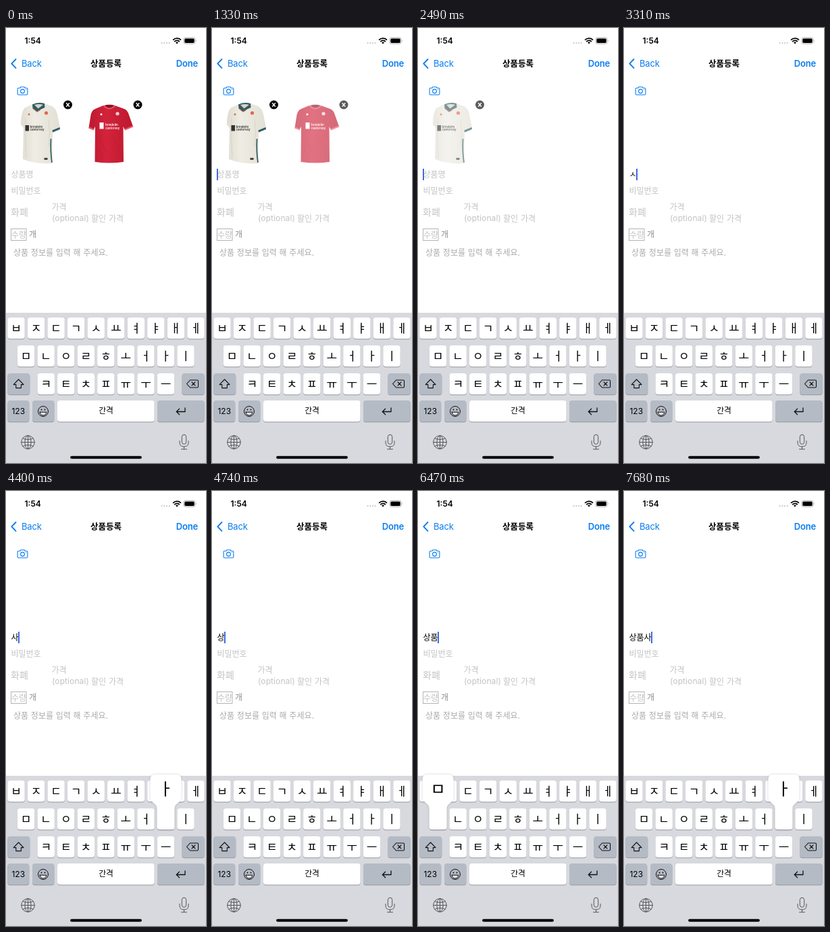
Recreate the animation shown at these times as an HTML page. Size 296 px wide and 640 px high, loop 8000 ms.

```html
<!DOCTYPE html>
<html lang="ko">
<head>
<meta charset="utf-8">
<title>상품등록</title>
<style>
html, body { margin: 0; width: 100%; height: 100%; overflow: hidden; background: #fff; }
svg { display: block; width: 100%; height: 100%; }
text { font-family: "Noto Sans CJK KR", "Noto Sans CJK", "Noto Sans CJK JP", sans-serif; font-size: 12px; }
.latin { font-family: Inter, sans-serif; }
.blue { fill: #0a7dee; }
.hint { fill: #c3c3c5; }
.line { fill: none; stroke: #0a7dee; stroke-width: 1.1; stroke-linecap: round; stroke-linejoin: round; }
.icon { fill: none; stroke: #111; stroke-width: 1.1; stroke-linecap: round; stroke-linejoin: round; }
.mid { text-anchor: middle; }
.cap { font-size: 17px; text-anchor: middle; }
.sponsor { font: 600 4.4px Inter, sans-serif; }
#popup path { filter: drop-shadow(0 0 1.5px rgba(0, 0, 0, .2)); }
</style>
</head>
<body>
<svg viewBox="0 0 296 640">
  <defs>
    <linearGradient id="cream"><stop stop-color="#dfdcd1"/><stop offset=".35" stop-color="#efece3"/><stop offset="1" stop-color="#e2dfd4"/></linearGradient>
    <linearGradient id="red"><stop stop-color="#bd1930"/><stop offset=".4" stop-color="#d3233b"/><stop offset="1" stop-color="#bb182e"/></linearGradient>
    <g id="close">
      <circle r="6.5"/>
      <path d="M-2.3-2.8 2.3 2.8M2.3-2.8-2.3 2.8" stroke="#fff" stroke-width="1.4"/>
    </g>
  </defs>

  <!-- status bar -->
  <text class="latin" x="27.5" y="23" style="font-weight:600">1:54</text>
  <g fill="#c4c4c6"><circle cx="230.5" cy="22" r="1.1"/><circle cx="234.3" cy="22" r="1.1"/><circle cx="238" cy="22" r="1.1"/><circle cx="241.7" cy="22" r="1.1"/></g>
  <path d="M247 17.6Q253 12.6 259 17.6M249.2 20Q253 16.8 256.8 20" fill="none" stroke="#000" stroke-width="1.8"/>
  <path d="M251 21.2Q253 19.8 255 21.2L253 23.4Z"/>
  <rect x="263" y="14.2" width="17" height="9" rx="2.6" fill="none" stroke="#999" stroke-width=".8"/>
  <rect x="264.3" y="15.5" width="14.4" height="6.4" rx="1.6"/>
  <path d="M281 17.2q1.4 1.5 0 3z" fill="#999"/>

  <!-- navigation bar -->
  <path class="line" d="M14.5 46 8.3 52.4 14.5 58.8" style="stroke-width:1.9"/>
  <text class="latin blue" x="23" y="57" style="font-size:13px;letter-spacing:-.2px">Back</text>
  <text class="mid" x="148" y="57" style="font-size:12.5px;font-weight:600">상품등록</text>
  <text class="latin blue" x="284" y="57" text-anchor="end" style="font-size:13px;font-weight:600;letter-spacing:-.15px">Done</text>
  <path class="line" d="M18.600 88.300h2.200l1.200-1.600h5l1.200 1.600h2.200q1.500 0 1.500 1.500v6.900q0 1.500-1.500 1.500H18.600q-1.500 0-1.500-1.500v-6.900q0-1.500 1.500-1.500z"/>
  <circle class="line" cx="24.500" cy="93" r="2.900"/>
  <circle class="blue" cx="29.600" cy="90.600" r=".6"/>

  <!-- pictures -->
  <g id="away">
    <path d="M39 112Q48 118 57 111L68 115Q74 118 76 127L80 147 69 152 68.500 199Q45 201 25 193L26 147 22 142Q22 126 27 118Z" fill="url(#cream)"/>
    <path d="M39 112.500Q48 108.500 57 111L57.500 117 51 120 46 123 39.500 118Z" fill="#2f5c62"/>
    <path d="M42 113Q49 111 55 113L47.500 118.500Z" fill="#d8d2c5"/>
    <path d="M39.500 118.500 46 123.500 51 120.500" fill="none" stroke="#d9584a"/>
    <path d="M68.500 150.500 79.500 146 80 149 69 153.500Z" fill="#2f5c62"/>
    <path d="M66.500 163Q65.500 182 68 198" fill="none" stroke="#2f5c62" stroke-width="1.700"/>
    <path d="M29 132Q28 160 30 190M63 134Q66 153 63 174" fill="none" stroke="#d5d1c5" stroke-width=".8"/>
    <circle cx="34" cy="127" r="1.500" fill="#e0684f"/>
    <circle cx="59.500" cy="125" r="2.600" fill="#e0684f"/>
    <rect x="28.500" y="143" width="5.500" height="8.500" fill="#333"/>
    <text class="sponsor" x="35.500" y="147" fill="#333">brindelm</text>
    <text class="sponsor" x="35.500" y="151" fill="#333">castorvey</text>
    <rect x="56.500" y="191" width="5" height="3" fill="#3d4b45"/>
    <use href="#close" x="91.500" y="113"/>
  </g>
  <g id="home">
    <path d="M144 114Q153 118 161 114L175 119Q180 121 182 128L188 145 176 150 173.500 145 174 197Q153 200 131.500 197L132 145 129.500 150 122.500 147 125.500 128Q127 121 132 119Z" fill="url(#red)"/>
    <path d="M145 114Q153 111.500 161 114L158 117.500Q153 120.500 148 117.500Z" fill="#8f1425"/>
    <path d="M144.500 114Q153 123 161.500 114" fill="none" stroke="#f06a70" stroke-width="1.400"/>
    <path d="M122.500 146.500 130 149.500M176 149.500 188 144.500" stroke="#f0595f" stroke-width="2.200"/>
    <path d="M136 160 150 184M158 160 172 188M136 177 144 192M160 133 170 143M136 133 144 140" stroke="#c21c33" fill="none"/>
    <circle cx="141" cy="127" r="1.500" fill="#fff"/>
    <circle cx="165" cy="126" r="2.600" fill="#f3cdd0"/>
    <rect x="138.500" y="139" width="6" height="9.500" fill="#fff"/>
    <text class="sponsor" x="147" y="144" fill="#fff">brindelm</text>
    <text class="sponsor" x="147" y="148.500" fill="#fff">castorvey</text>
    <use href="#close" x="195" y="113"/>
  </g>

  <!-- form -->
  <text id="name" x="7.500" y="219.800"></text>
  <rect id="caret" y="207" width="2" height="17" fill="#3f6be0"/>
  <g class="hint">
    <text x="7.500" y="243.600">비밀번호</text>
    <text x="7" y="276" style="font-size:14px">화폐</text>
    <text x="67.500" y="267.500">가격</text>
    <text class="latin" x="68" y="284" style="letter-spacing:.1px">(optional)</text>
    <text x="126" y="284.500">할인</text>
    <text x="152" y="284.500">가격</text>
    <text x="8" y="308.500">수량</text>
  </g>
  <rect x="7.500" y="295.500" width="22.500" height="17" fill="none" stroke="#b4b4b6"/>
  <text x="34" y="308" fill="#8e8e90">개</text>
  <text x="11" y="334.500" fill="#aaaaac" style="word-spacing:.4px">상품 정보를 입력 해 주세요.</text>

  <!-- keyboard -->
  <rect y="419" width="296" height="221" fill="#d7d9de"/>
  <g id="keys"></g>
  <path class="icon" d="M18.600 517 26 524.600H22.400V529.600H14.800V524.600H11.200Z"/>
  <path class="icon" d="M272.500 518H283Q284.500 518 284.500 519.500V527.500Q284.500 529 283 529H272.500L267.500 523.500ZM275 521 280 526M280 521 275 526"/>
  <text class="latin mid" x="18.300" y="568.200" style="font-size:12px">123</text>
  <g class="icon" style="stroke-width:1"><circle cx="55" cy="564" r="7.500"/><path d="M50.200 565.200H59.800Q59 570 55 570T50.200 565.200Z" fill="#e4e7ec"/></g>
  <circle cx="52.500" cy="561.500" r=".9"/><circle cx="57.500" cy="561.500" r=".9"/>
  <text class="mid" x="148" y="567.300" style="font-size:11.800px">간격</text>
  <path class="icon" d="M265 559V564.500H252.500M256.500 560.300 252.300 564.500 256.500 568.700" style="stroke-width:1.300"/>
  <g class="icon" style="stroke:#55585e;stroke-width:1">
    <circle cx="32.500" cy="609.500" r="9.800"/><ellipse cx="32.500" cy="609.500" rx="4.600" ry="9.800"/>
    <path d="M22.700 609.500h19.600M32.500 599.700v19.600M24.800 603.700Q32.500 607.500 40.200 603.700M24.800 615.300Q32.500 611.500 40.200 615.300"/>
    <rect x="260.300" y="598.300" width="6.400" height="14" rx="3.200"/><path d="M257 607.500v2.500q0 6 6.500 6t6.500-6v-2.500M263.500 616v3.700M259.500 619.700h8"/>
  </g>
  <rect x="95.100" y="629.800" width="105.800" height="4" rx="2"/>
  <g id="popup"><path fill="#fff"/><text class="mid" style="font-size:24px"></text></g>
</svg>
<script>
const $ = id => document.getElementById(id);
const LOOP = 8000, PITCH = 29.55, KEY_HEIGHT = 31.2;
const rows = [["ㅂㅈㄷㄱㅅㅛㅕㅑㅐㅔ", 15, 426], ["ㅁㄴㅇㄹㅎㅗㅓㅏㅣ", 29.6, 467], ["ㅋㅌㅊㅍㅠㅜㅡ", 59.2, 508]];
const centers = {};

const keyShape = (x, y, w, fill) =>
  `<rect x="${x}" y="${y + 1}" width="${w}" height="${KEY_HEIGHT}" rx="4" fill="#94979d"/>` +
  `<rect x="${x}" y="${y}" width="${w}" height="${KEY_HEIGHT}" rx="4" fill="${fill}"/>`;

let keys = "";
for (const [letters, start, y] of rows) {
  [...letters].forEach((letter, i) => {
    const x = start + i * PITCH;
    centers[letter] = [x, y];
    keys += keyShape(x - 12.7, y, 25.4, "#fff") + `<text class="cap" x="${x}" y="${y + 21.6}">${letter}</text>`;
  });
}
for (const [x, y, w] of [[2.3, 508, 33], [260.3, 508, 33.4], [2.3, 548, 32], [39, 548, 32.4], [224, 548, 69.7]])
  keys += keyShape(x, y, w, "#b5bbc5");
$("keys").innerHTML = keys + keyShape(76, 548, 143.6, "#fff");

// Each track lists [start time, value].
const tracks = {
  caret: [[0, 0], [100, .5], [220, 1], [740, .5], [860, 0], [1100, .5], [1210, 1], [1780, .5], [1900, 0],
    [2140, .5], [2250, 1], [2820, .5], [2940, 0], [3170, 1]],
  home: [[0, 1], [1330, .64], [1450, 0]],
  away: [[0, 1], [2490, .64], [2610, 0]],
  name: [[0, ""], [3310, "ㅅ"], [4400, "사"], [4740, "상"], [5180, "상ㅍ"], [5630, "상푸"], [6470, "상품"],
    [7160, "상품ㅅ"], [7680, "상품사"]],
  popup: [[0, ""], [3170, "ㅅ"], [3310, ""], [3880, "ㅏ"], [4510, ""], [4630, "ㅇ"], [4740, ""], [5080, "ㅍ"],
    [5180, ""], [5530, "ㅜ"], [6130, ""], [6360, "ㅁ"], [6940, "ㅅ"], [7160, ""], [7570, "ㅏ"]]
};
const valueAt = (track, t) => tracks[track].findLast(([start]) => start <= t)[1];

function showPopup(letter) {
  const popup = $("popup");
  popup.style.display = letter ? "" : "none";
  if (!letter) return;
  const [x, y] = centers[letter], [shape, label] = popup.children;
  shape.setAttribute("d", `M${x - 23} ${y - 43}q0-7 7-7h32q7 0 7 7v27c0 8-10 8-10 16v27q0 4-4 4h-18q-4 0-4-4v-27c0-8-10-8-10-16z`);
  label.setAttribute("x", x);
  label.setAttribute("y", y - 20);
  label.textContent = letter;
}

function render(now) {
  const t = now % LOOP, name = valueAt("name", t);
  for (const id of ["caret", "home", "away"]) $(id).style.opacity = valueAt(id, t);
  $("name").textContent = name || "상품명";
  $("name").setAttribute("fill", name ? "#000" : "#c3c3c5");
  $("caret").setAttribute("x", 7 + 11 * name.length);
  showPopup(valueAt("popup", t));
}

const begin = performance.now();
function tick() {
  render(performance.now() - begin);
  requestAnimationFrame(tick);
}
tick();
</script>
</body>
</html>
```
